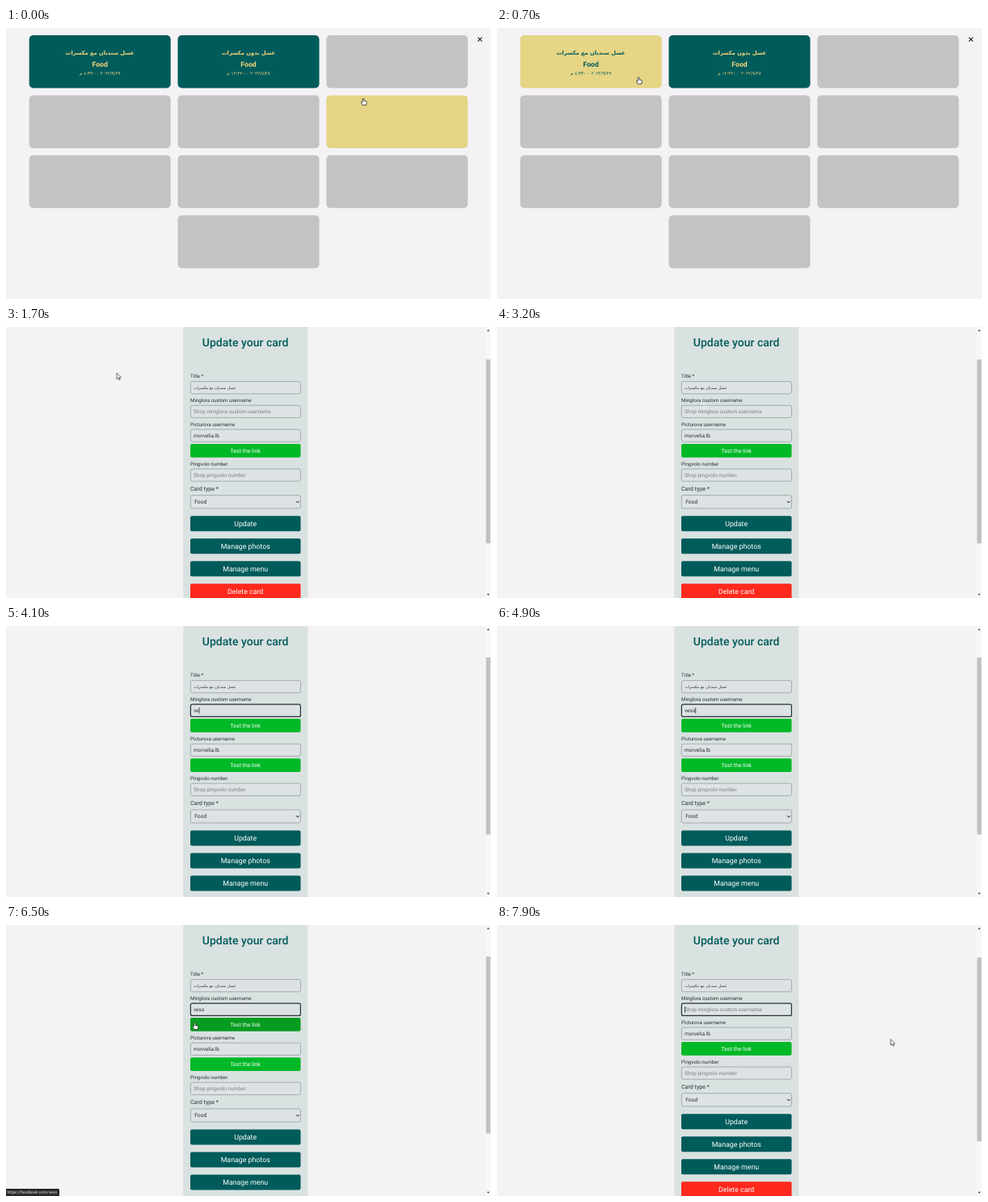
An HTML page that plays this animation: 600x336 px, repeating every 8 s.

```html
<!DOCTYPE html>
<html lang="en">
<head>
<meta charset="utf-8">
<title>Update your card</title>
<style>
html, body { margin: 0; width: 100%; height: 100%; overflow: hidden; background: #f4f2f5; }
svg { display: block; width: 100vw; height: 100vh; font-family: Roboto, sans-serif; text-rendering: geometricPrecision; }
.ar { font-family: 'DejaVu Sans', sans-serif; direction: rtl; }
.mid { text-anchor: middle; }
.card { fill: #c4c2c4; }
.card.full { fill: #005b5b; }
.card.hover { fill: #e5d585; }
.card + g { fill: #f5d77c; }
.card.hover + g { fill: #005b5b; }
.field { fill: #dde3e4; stroke: #969d9f; stroke-width: .8; }
.field.focus { stroke: #263135; stroke-width: 1.2; }
.test { fill: #00b927; }
.test.hover { fill: #069c20; }
</style>
</head>
<body>
<svg id="stage" viewBox="0 0 600 336"></svg>
<script>
const stage = document.getElementById('stage');
const $ = id => document.getElementById(id);
const TEAL = '#005b5b', INK = '#2a3133', HINT = '#7b8183';
const NAME = 'vess', SHIFT = 19.2;

const text = (x, y, size, str, attrs = '') =>
  `<text x="${x}" y="${y}" font-size="${size}" ${attrs}>${str}</text>`;
const rect = (x, y, w, h, r, attrs) =>
  `<rect x="${x}" y="${y}" width="${w}" height="${h}" rx="${r}" ${attrs}/>`;
const label = (y, str, size = 6.2) => text(228, y, size, str, `fill="${INK}"`);
const field = (y, str, color = INK, id = '') =>
  rect(228.4, y, 136, 15.2, 2, `class="field" ${id && `id="${id}"`}`) +
  (str && text(232, y + 9.9, 6.5, str, `fill="${color}"`));
const test = (y, id = '') =>
  rect(228, y, 136.5, 16.8, 2, `class="test" ${id && `id="${id}"`}`) +
  text(296.2, y + 10.8, 6.95, 'Test the link', 'class="mid" fill="#fff"');
const button = (y, str, color = TEAL) =>
  rect(228, y, 136.5, 19, 2, `fill="${color}"`) +
  text(296.2, y + 12.7, 8.8, str, 'class="mid" fill="#fff"');

// Card list
const titles = ['عسل سنديان مع مكسرات', 'عسل بدون مكسرات'];
const dates = ['٢٠٢٢/٩/٢٩ ٤:٣٣:٠٠ م', '٢٠٢٢/٧/٢٨ ١٢:٢٢:٠٠ م'];
const cards = Array.from({ length: 10 }, (_, i) => ({
  x: 28.7 + 183.8 * (i === 9 ? 1 : i % 3),
  y: 9 + 74.4 * Math.floor(i / 3), w: 175, h: 65.5
}));
const cardMarkup = ({ x, y, w, h }, i) => {
  const c = x + w / 2;
  return rect(x, y, w, h, 5, `class="card ${i < 2 ? 'full' : ''}"`) + '<g class="mid">' +
    (i < 2 ? text(c, y + 24, 6.7, titles[i], 'class="ar" font-weight="700"') +
      text(c, y + 38.5, 8.7, 'Food', 'font-weight="700"') +
      text(c, y + 48.5, 5.6, dates[i], 'class="ar"') : '') + '</g>';
};

// Page with the form
const form = `
  <rect x="219.3" width="154" height="336" fill="#dae1e1"/>
  ${text(296.2, 24, 14, 'Update your card', `class="mid" fill="${TEAL}" font-weight="500"`)}
  ${label(63.3, 'Title *')}${field(67.6, '')}
  ${text(284.5, 77.2, 4.75, titles[0], `class="ar" fill="${INK}"`)}
  ${label(93.2, 'Minglora custom username')}
  ${field(97.2, 'Shop minglora custom username', HINT, 'user')}
  <text id="typed" x="232" y="107.1" font-size="6.5" fill="${INK}"></text>
  <rect id="caret" y="101" width=".7" height="7.6" fill="#111"/>
  <g id="extra">${test(115, 'link')}</g>
  <g id="rest">
    ${label(123, 'Picturova username')}${field(127, 'morvelia.lb')}${test(145)}
    ${label(172, 'Pingvolo number')}${field(176, 'Shop pingvolo number', HINT)}
    ${label(202.6, 'Card type *', 7.1)}
    ${rect(228.4, 208.7, 136, 16.2, 2, 'class="field"')}
    ${text(233.2, 219.3, 6.7, 'Food', `fill="${INK}"`)}
    <path d="M358.8 215.8l2 2.2 2-2.2" fill="none" stroke="#222" stroke-width="1"/>
    ${button(234.2, 'Update')}${button(262.2, 'Manage photos')}
    ${button(290.2, 'Manage menu')}${button(318.2, 'Delete card', '#ff281c')}
  </g>
  <rect x="593" width="7" height="336" fill="#f8f7f8"/>
  <rect id="thumb" x="593.8" width="5.5" fill="#c1c0c2"/>
  <path d="M594.8 5.2l1.8-2.2 1.8 2.2zM594.8 330.8l1.8 2.2 1.8-2.2z" fill="#555"/>
  <g id="status"><path d="M0 327h64.5q1.5 0 1.5 1.5V336H0z" fill="#292a2d"/>
    ${text(1.5, 333.4, 5.1, 'https://facebook.com/' + NAME, 'fill="#e8e8e8"')}</g>`;

const hand = 'M-.9 .8Q0-.6 .9 .8V3.4L3.6 4Q4.5 4.3 4.3 5.4L3.6 8.6H-.6L-2.9 5.4Q-2.6 4.2-.9 5.2Z';
const pointers = `
  <g id="pointer" stroke-linejoin="round">
    <path id="arrow" d="M0 0V7.6L1.8 6 3 8.7 4.2 8.2 3 5.6H5.3Z" fill="#fff" stroke="#333" stroke-width=".7"/>
    <path id="hand" d="${hand}" fill="#fff" stroke="#222" stroke-width=".8"/>
    <path id="beam" d="M-1.5-3.5H1.5M0-3.5V3.5M-1.5 3.5H1.5" fill="none" stroke="#f2f5f5" stroke-width=".8"/>
  </g>`;

stage.innerHTML = `
  <rect width="600" height="336" fill="#f4f2f5"/>
  <g id="list">${cards.map(cardMarkup).join('')}
    <path d="M583.8 11.6l5 5m0-5l-5 5" stroke="#222" stroke-width="1.2"/></g>
  <g id="form">${form}</g>${pointers}`;
const cardNodes = [...document.querySelectorAll('.card')];

// Pointer stops: time, x, y
const path = [
  [0, 442, 87], [900, 137, 57], [1900, 137, 57], [2600, 256, 97.6], [5500, 256, 97.6],
  [6000, 233.5, 121], [6600, 233.5, 121], [7000, 262, 106], [7600, 262, 106],
  [7850, 487, 141.5], [8000, 487, 141.5]
];
// Edits of the user name: time, letters shown
const strokes = [[3800, 1], [4000, 2], [4200, 3], [4400, 4], [7200, 3], [7300, 2], [7400, 1], [7500, 0]];

function pointerAt(t) {
  const i = path.findIndex(p => p[0] > t);
  const [a, b] = [path[i - 1], path[i]];
  const u = (t - a[0]) / (b[0] - a[0]), e = u * u * (3 - 2 * u);
  return [a[1] + (b[1] - a[1]) * e, a[2] + (b[2] - a[2]) * e];
}
const inside = (px, py, { x, y, w, h }) => px >= x && px <= x + w && py >= y && py <= y + h;
const show = (id, on) => { $(id).style.display = on ? '' : 'none'; };

function draw(t) {
  const [x, y] = pointerAt(t);
  const editing = t >= 1600, focused = t >= 3400;
  const [since, count] = strokes.filter(s => s[0] <= t).pop() || [3400, 0];
  const over = editing ? -1 : cards.findIndex(c => inside(x, y, c));
  const overField = editing && inside(x, y, { x: 228, y: 97, w: 137, h: 16 });
  const overLink = editing && count > 0 && inside(x, y, { x: 228, y: 115, w: 137, h: 17 });

  show('list', !editing);
  show('form', editing);
  cardNodes.forEach((n, i) => n.classList.toggle('hover', i === over));

  $('user').classList.toggle('focus', focused);
  $('user').nextElementSibling.style.display = count ? 'none' : '';
  $('typed').textContent = NAME.slice(0, count);
  show('caret', focused && (t - since) % 1060 < 530);
  $('caret').setAttribute('x', 232 + (count ? $('typed').getComputedTextLength() + .2 : 0));
  show('extra', count);
  $('link').classList.toggle('hover', overLink);
  $('rest').setAttribute('transform', `translate(0 ${count ? SHIFT : 0})`);
  $('thumb').setAttribute('y', count ? 39 : 40.3);
  $('thumb').setAttribute('height', count ? 219.5 : 228);
  show('status', t >= 6000 && t < 7300);

  const typing = (t >= 3800 && t < 5500) || (t >= 7200 && t < 7600);
  const shape = over >= 0 || overLink ? 'hand' : overField ? 'beam' : 'arrow';
  show('pointer', !typing);
  ['arrow', 'hand', 'beam'].forEach(id => show(id, id === shape));
  $('pointer').setAttribute('transform', `translate(${x} ${y})`);
}

const start = performance.now();
function tick() {
  draw((performance.now() - start) % 8000);
  requestAnimationFrame(tick);
}
tick();
</script>
</body>
</html>
```
